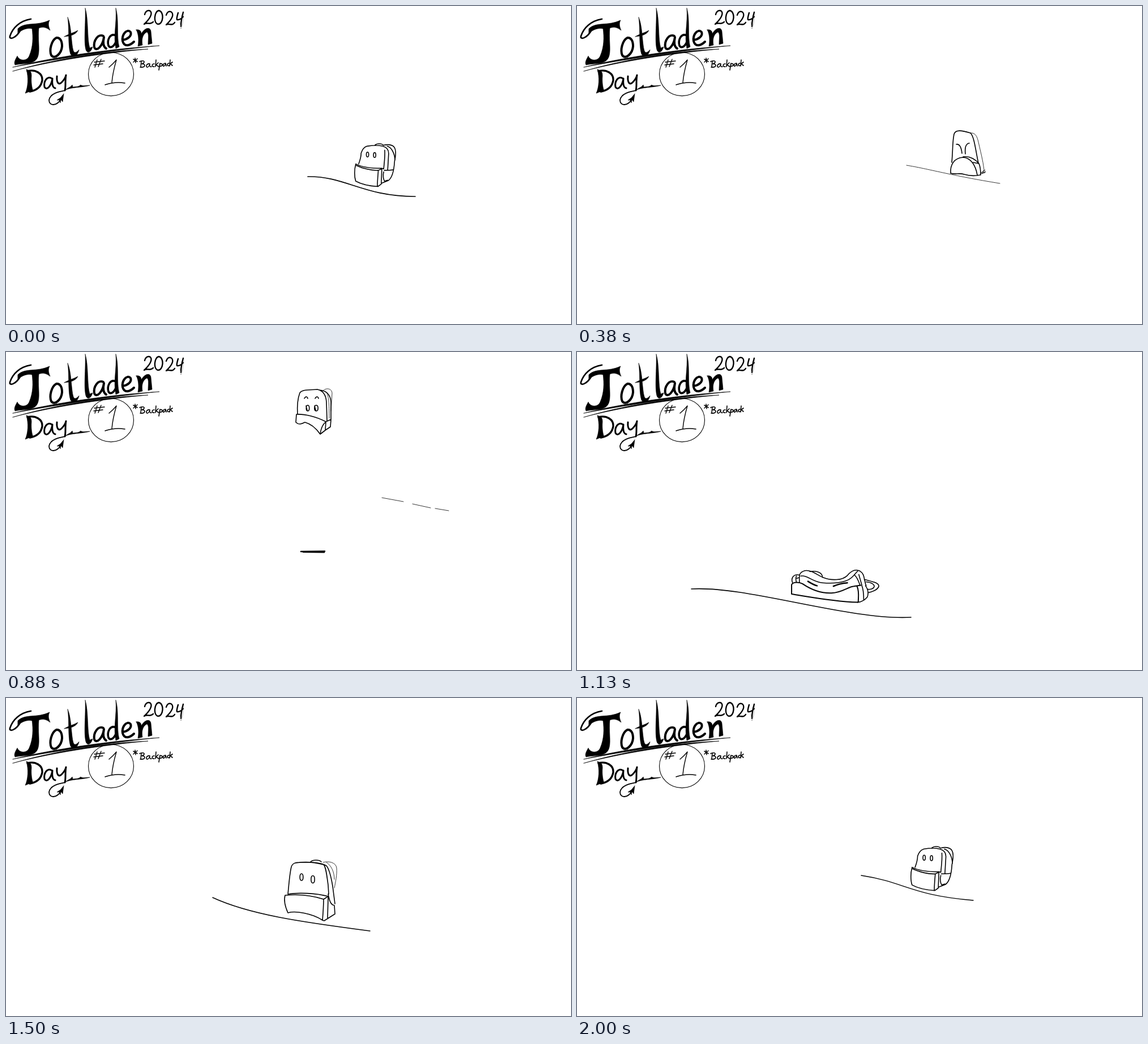
These frames come from a looping animation (998 by 561 pixels, 2060 ms). An HTML page:

```html
<!DOCTYPE html>
<html lang="en">
<head>
<meta charset="utf-8">
<title>Jumping backpack</title>
<style>
  html, body { margin: 0; width: 100%; height: 100%; overflow: hidden; background: #fff; }
  svg { display: block; width: 100vw; height: 100vh; }
  path, ellipse { fill: none; stroke: #000; stroke-linecap: round; stroke-linejoin: round; }
  .solid { fill: #000; stroke-width: .6; }
  .pose path { stroke-width: 1.6; vector-effect: non-scaling-stroke; }
  .pose .thin { stroke-width: .8; }
  .pose .bold { stroke-width: 2.5; }
</style>
</head>
<body>
<svg id="stage" viewBox="0 0 998 561">
  <g role="img" aria-label="Jotladen 2024, Day #1, * Backpack">
    <!-- title -->
    <path stroke-width="2.6" d="M26,42C17,58 5,60 7,53C12,38 25,26 44,23"/>
    <path class="solid" d="M21,40C34,27 54,36 77,25C74,31 75,36 78,43C68,35 61,38 58,39C56,58 60,76 57,87C53,104 36,100 16,104C13,99 18,92 20,88C23,97 37,98 41,88C48,72 48,55 46,40C37,38 28,42 21,48Z"/>
    <path stroke-width="4" d="M89,56C80,61 76,78 80,87C86,95 98,84 99,71C99,61 95,55 89,56"/>
    <path class="solid" d="M109,20C116,36 115,66 119,79C121,84 125,82 129,77C127,88 118,92 114,85C109,70 112,42 109,20Z"/>
    <path class="solid" d="M103,54C111,49 118,48 127,43C123,51 113,53 103,54Z"/>
    <path class="solid" d="M140,4C146,24 143,58 148,74L153,72C150,83 143,84 141,77C137,62 141,30 140,4Z"/>
    <path stroke-width="4" d="M172,53C163,48 154,61 156,73C160,82 171,70 173,55C171,64 172,72 177,75"/>
    <path class="solid" d="M194,4C200,24 195,54 200,72L194,75C189,52 196,30 194,4Z"/>
    <path stroke-width="3.6" d="M194,52C184,47 178,60 181,70C185,77 193,69 195,60"/>
    <path stroke-width="4" d="M206,60C214,59 223,53 220,46C214,39 204,50 206,62C209,73 219,70 226,63"/>
    <path class="solid" d="M230,42C236,41 239,44 239,49C245,38 255,36 256,45L258,66L251,68C251,57 253,49 249,46C242,49 239,58 241,69L233,71C235,60 234,49 230,42Z"/>
    <path class="solid" d="M12,108C65,94 170,76 271,70C180,79 75,96 12,108Z"/>
    <path class="solid" d="M12,115C75,96 170,79 251,76C170,83 75,98 12,115Z"/>
    <!-- year -->
    <path stroke-width="2.4" d="M245,15C247,5 259,6 256,16C254,23 248,28 244,32C249,28 255,34 260,28M270,8C262,9 260,29 268,32C278,33 280,10 270,8M283,16C286,6 296,9 294,18C292,25 287,29 283,33C288,30 294,36 298,29M304,12C302,19 301,22 302,24C306,25 310,22 313,19M313,11C310,21 309,28 309,36"/>
    <path stroke-width="1" stroke-dasharray=".4 2.2" style="stroke:#777" d="M314,14C312,24 314,32 308,40M307,29L310,41"/>
    <!-- day -->
    <path class="solid" d="M36,112C43,114 45,116 45,123C44,136 46,145 48,150C43,150 39,152 34,154C39,143 40,126 36,112Z"/>
    <path stroke-width="3.4" d="M38,115C52,111 65,119 64,131C62,144 53,149 42,151"/>
    <path stroke-width="3" d="M81,128C73,122 66,133 68,143C72,150 80,141 82,128C81,138 82,144 87,145M90,124C89,135 93,140 98,135C103,130 105,126 106,122C104,132 106,141 104,149"/>
    <path stroke-width="1.8" d="M104,149C94,151 78,154 76,166C76,177 90,177 97,164"/>
    <path class="solid" d="M102,155L100,169L97,165L96,171L94,166L90,166L96,162ZM104,149C110,143 114,144 117,139L118,143C124,142 128,143 132,139C134,142 142,140 148,140C136,144 112,143 104,149Z"/>
    <!-- number -->
    <ellipse cx="185.5" cy="120.3" rx="40" ry="38.3" stroke-width="1.1"/>
    <path stroke-width="1.4" d="M161,95L157,108M168,94L163,107M156,99L174,97M155,104L171,102M182,108C187,104 191,100 195,95C191,109 188,122 187,135M175,139C187,135 199,134 210,136"/>
    <!-- prompt -->
    <path stroke-width="1.6" d="M228,92L229,100M225,94L232,98M232,93L225,99M239,97L238,108M236,98C246,94 246,101 240,102C248,102 246,109 237,108M254,102C248,101 246,108 250,108C253,107 254,103 254,102C253,106 255,108 257,107M262,102C257,102 257,108 262,107M265,95L264,107M269,100L265,104L270,107M272,101L270,113M272,102C278,100 277,107 272,106M282,101C277,101 276,107 279,106C281,105 282,102 282,101L283,106M288,101C284,101 284,107 288,105M290,95L289,106M294,99L290,102L294,105"/>
  </g>
</svg>
<script>
const LOOP = 2060;
const stage = document.getElementById('stage');

const eye = (x, y, rx, ry) =>
  `M${x},${y - ry}c${rx * 1.4},0 ${rx * 1.4},${2 * ry} 0,${2 * ry}c${-rx * 1.4},0 ${-rx * 1.4},${-2 * ry} 0,${-2 * ry}`;

// Each pose: top left corner, then regular, bold and thin ink.
const poses = {
  idle: {
    at: [547, 283],
    ink: 'M555,324C558,316 560,308 560,302C562,296 565,290 572,288C584,286 596,286 604,288C612,290 616,296 616,303L614,337' +
      'M608,296C609,308 607,322 606,333M588,286C592,282 602,282 605,286M606,286C613,284 624,284 628,291C633,300 629,312 628,319' +
      'C627,335 624,352 615,358L602,363M613,288C621,290 628,301 629,316M607,337C613,337 619,337 625,336M606,340C604,347 605,356 608,359L614,357' +
      'M549,325C546,335 546,350 549,359C560,365 578,369 594,370L601,365M549,324C562,331 582,333 602,333L606,334' +
      'M550,327C562,333 582,338 595,337L602,334C602,345 601,356 601,365M595,337C594,349 593,360 593,369' +
      eye(573, 305, 2.3, 5) + eye(587.5, 306, 2.3, 5),
  },
  strain: {
    at: [659, 219],
    ink: 'M662,276C664,255 663,240 666,226C669,217 681,220 695,224C702,231 704,255 709,277M660,295C659,280 666,268 682,267' +
      'C696,268 704,281 707,298M660,295C668,298 675,294 684,297C694,300 703,300 713,298M682,266C695,264 705,272 710,278' +
      'M700,276L710,278C713,285 713,292 713,298M670,244C676,243 679,250 680,260M693,242C686,243 685,252 686,261',
    thin: 'M695,224C704,223 707,231 709,240C713,258 717,272 719,289L713,297M713,295L721,289L715,296L722,292L716,295L721,294',
  },
  fly: {
    at: [512, 64],
    ink: 'M515,110C514,95 516,80 519,72C524,66 535,67 550,66C560,68 565,75 566,88L567,121M553,67C566,68 573,75 574,88L574,119' +
      'M513,110C527,109 548,114 565,123L574,119L573,132L564,138M513,110L512,124C517,129 522,127 528,124C540,127 548,135 555,145' +
      'L564,138L565,123M565,123C559,128 556,136 555,145M527,82C529,78 532,78 533,82M546,82C548,78 551,78 552,82' +
      eye(533, 99, 2.6, 5) + eye(548, 99, 3, 5) + 'M530,95L532,103M545,95L547,103',
    thin: 'M560,68C567,62 576,65 576,73L574,104M565,70C570,73 571,92 571,117',
  },
  squash: {
    at: [413, 350],
    ink: 'M427,376C427,366 424,356 436,352C447,350 456,361 466,366C480,373 498,372 506,362C510,356 518,347 527,353C535,359 533,370 537,383' +
      'M429,363C441,361 448,375 465,377C486,379 506,376 515,364L523,353M518,361C523,367 525,375 527,382M525,360L530,382' +
      'M427,361C417,358 412,368 416,378M422,363C420,368 421,372 422,376M427,366L422,368M444,354C452,352 465,354 465,366' +
      'M534,370C545,374 558,376 558,384C556,392 548,395 541,397M537,375C545,376 552,380 550,386C548,390 543,391 540,390' +
      'M536,383C540,390 541,399 539,406C535,412 530,416 523,417M530,383C533,392 533,405 533,411',
    bold: 'M441,374C446,378 450,381 456,383M483,384C490,380 497,378 506,377',
    heavy: 'M414,400L414,381C416,375 426,375 432,379C445,390 462,399 480,398C498,397 507,385 517,384L528,382' +
      'M522,384C526,395 524,408 524,416M414,400C440,405 480,415 523,417',
  },
  stand: {
    at: [491, 286],
    ink: 'M498,346C500,325 501,310 504,298C506,291 512,290 520,290C535,289 550,291 561,294C565,297 567,315 569,330L570,346' +
      'M511,291C530,288 557,290 566,296C572,303 575,320 577,332L581,363M538,289C542,285 553,285 557,289' +
      'M569,346C571,356 573,365 580,366L581,381L562,393M493,348C515,346 540,348 561,355L569,350M498,346C515,343 548,344 569,350' +
      'M493,348C490,358 494,370 498,379C511,375 541,380 559,392L562,393M561,355C561,368 560,380 559,392M569,352L568,388' +
      eye(522, 316, 2.7, 6) + eye(542, 320, 3, 6.5),
    thin: 'M560,290C570,287 583,290 584,300C585,312 582,325 580,335M566,290C574,295 580,306 580,320',
  },
};

// start, pose, left, top, x scale, y scale, ground, ground weight, shadow
const steps = [
  [0, 'idle', 616, 243, .868, .868, 'M533,301C600,300 630,336 723,336', 1.7],
  [130, 'idle', 633, 237, .83, .83, 'M549,294C605,296 650,324 731,328', 1.4],
  [250, 'strain', 646, 233, 1.06, .9, 'M566,288C615,291 660,314 739,320', 1.1],
  [380, 'strain', 659, 219, 1, 1, 'M582,281C620,287 660,299 747,313', .8],
  [500, 'fly', 648, 130, .85, 1.1, 'M602,275L756,305', .8],
  [630, 'fly', 605, 52, .9, .96, 'M622,269L765,297', .8],
  [750, 'fly', 558, 55, .95, .98, 'M642,263L774,288', .8, [578, 331, 30]],
  [880, 'fly', 512, 64, 1, 1, 'M664,257L702,264M718,268L750,275M758,276L782,280', .8, [542, 352, 42]],
  [1000, 'fly', 464, 200, 1.15, 1.25, 'M690,253L712,257M735,262L755,266M770,269L789,272', .7, [500, 396, 66]],
  [1130, 'squash', 378, 384, 1.07, .86, 'M202,418C300,412 480,474 590,468', 1.6],
  [1250, 'squash', 413, 350, 1, 1, 'M246,404C370,402 520,455 607,447', 1.4],
  [1380, 'stand', 462, 300, 1.09, .98, 'M306,378C390,392 520,434 625,430', 1.5],
  [1500, 'stand', 491, 286, 1, 1, 'M365,352C430,382 520,395 643,411', 1.5],
  [1630, 'idle', 520, 285, 1.06, 1.06, 'M408,342C470,362 560,394 659,398', 1.5],
  [1750, 'idle', 547, 283, 1, 1, 'M449,332C500,336 560,384 674,384', 1.4],
  [1880, 'idle', 570, 272, .945, .945, 'M482,323C535,330 590,362 688,371', 1.4],
  [2000, 'idle', 590, 262, .893, .893, 'M502,313C580,325 590,348 700,357', 1.4],
];

const line = (d, width) => `<path d="${d}" stroke-width="${width}"/>`;

function drawPose(name, x, y, sx, sy) {
  const { at: [ox, oy], ink, bold = '', heavy = '', thin = '' } = poses[name];
  return `<g class="pose" transform="translate(${x} ${y}) scale(${sx} ${sy}) translate(${-ox} ${-oy})">
    <path d="${ink}"/><path class="bold" d="${bold}"/><path style="stroke-width:2" d="${heavy}"/><path class="thin" d="${thin}"/></g>`;
}

function drawShadow([x, y, width]) {
  return line(`M${x - width / 2},${y}l${width},-.5m${-width + 4},1.2l${width - 5},.6`, 2.6);
}

steps.forEach(([start, pose, x, y, sx, sy, ground, weight, shadow], i) => {
  const scene = document.createElementNS('http://www.w3.org/2000/svg', 'g');
  scene.innerHTML = line(ground, weight) + drawPose(pose, x, y, sx, sy) + (shadow ? drawShadow(shadow) : '');
  stage.append(scene);
  const end = i + 1 < steps.length ? steps[i + 1][0] : LOOP;
  scene.animate([
    { opacity: 0, offset: 0 },
    { opacity: 1, offset: start / LOOP },
    { opacity: 0, offset: end / LOOP },
    { opacity: 0, offset: 1 },
  ].map(k => ({ ...k, easing: 'steps(1, end)' })), { duration: LOOP, iterations: Infinity });
});
</script>
</body>
</html>
```
